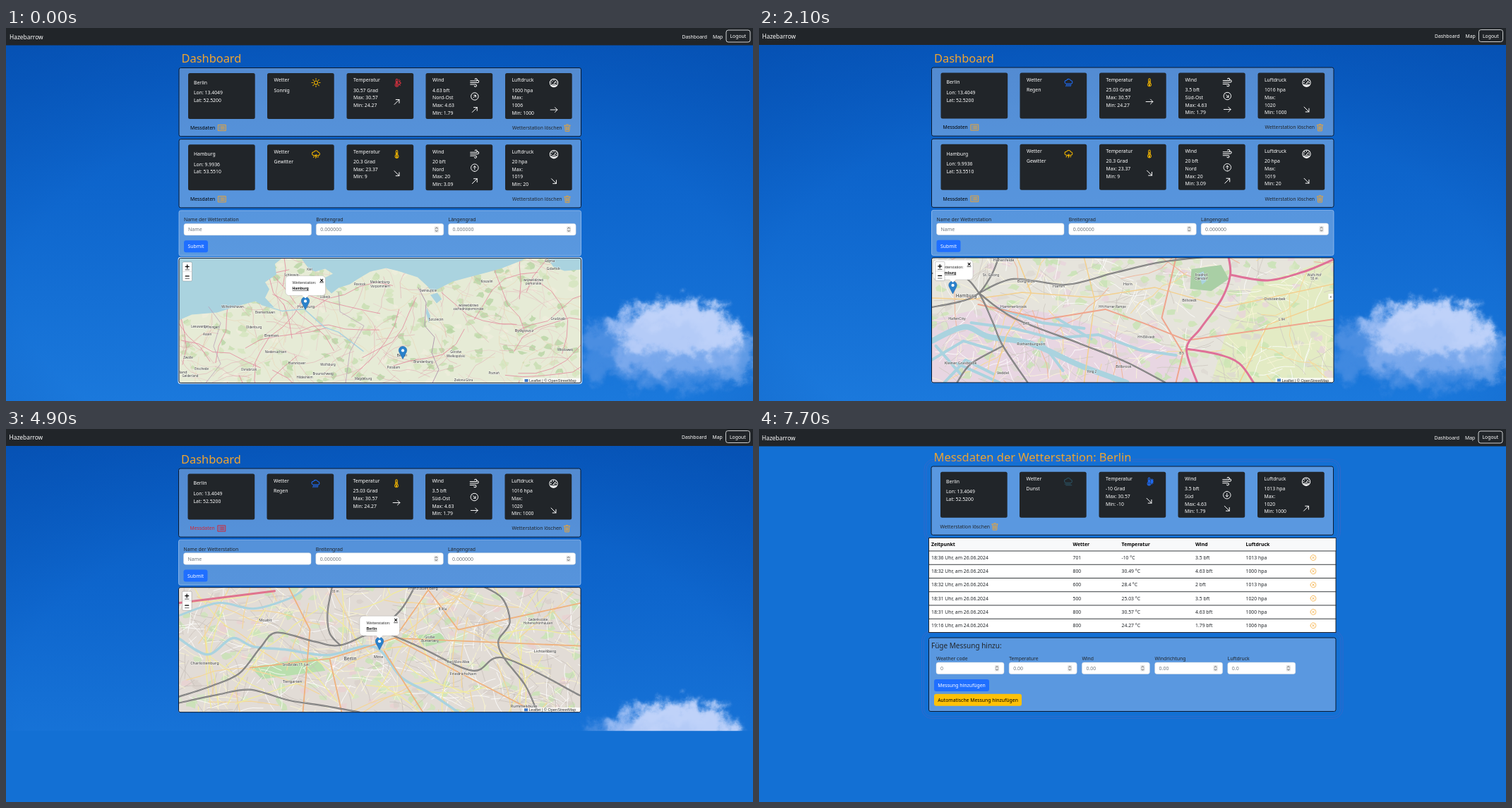
An HTML page that plays this animation: 1058 by 529 pixels, repeating every 8000 ms.

```html
<!DOCTYPE html>
<html lang="de">
<head>
<meta charset="utf-8">
<title>Hazebarrow</title>
<style>
html, body { margin: 0; width: 100%; height: 100%; overflow: hidden; background: #1370d4; }
svg { display: block; width: 1058px; height: 529px; font-family: "Noto Sans", "Open Sans", sans-serif; }
.arial { font-family: "Liberation Sans", Arial, sans-serif; }
.icon { fill: none; stroke-width: 1.25; stroke-linecap: round; stroke-linejoin: round; }
.line { fill: none; stroke-linecap: round; stroke-linejoin: round; }
</style>
</head>
<body>
<svg id="stage" viewBox="0 0 1058 529"></svg>
<script>
const DARK = '#212529', ORANGE = '#f2a52e', AMBER = '#f5b800', BLUE = '#1f6fff', WHITE = '#fff', GLASS = 'rgba(255,255,255,.3)';

// ---- drawing helpers ----
const text = (x, y, s, fill = WHITE, size = 6.85, attrs = '') =>
  `<text x="${x}" y="${y + size * .36}" font-size="${size}" fill="${fill}" ${attrs}>${s}</text>`;
const box = (x, y, w, h, fill, stroke = 'none', r = 2.5, attrs = '') =>
  `<rect x="${x}" y="${y}" width="${w}" height="${h}" rx="${r}" fill="${fill}" stroke="${stroke}" ${attrs}/>`;
const line = (d, color, w, attrs = '') => `<path class="line" d="${d}" stroke="${color}" stroke-width="${w}" ${attrs}/>`;
const group = (x, y, body) => `<g transform="translate(${x} ${y})">${body}</g>`;

// Smooth path through points given as "x,y x,y ...".
function curve(list) {
  const p = list.split(' ').map(s => s.split(',').map(Number));
  return p.slice(1).reduce((d, c, i) => {
    const b = p[i], a = p[i - 1] || b, e = p[i + 2] || c;
    return d + `C${b[0] + (c[0] - a[0]) / 6} ${b[1] + (c[1] - a[1]) / 6} ${c[0] - (e[0] - b[0]) / 6} ${c[1] - (e[1] - b[1]) / 6} ${c}`;
  }, 'M' + p[0]);
}

const CLOUD = 'M4.2 10.5a3 3 0 0 1 .2-6A4.2 4.2 0 0 1 12 5a2.8 2.8 0 0 1 .6 5.5z';
const THERM = 'M6.5 9V2.5a1.5 1.5 0 0 1 3 0V9a3 3 0 1 1-3 0zM8 5v7M7.4 11v2M8.6 11v2';
const ICONS = {
  sun: 'M4.8 8a3.2 3.2 0 1 0 6.4 0a3.2 3.2 0 1 0-6.4 0M8 .6v2M8 13.4v2M.6 8h2M13.4 8h2M2.8 2.8l1.3 1.3M11.9 11.9l1.3 1.3M2.8 13.2l1.3-1.3M11.9 4.1l1.3-1.3',
  clouds: 'M3.4 13a2.6 2.6 0 0 1 .2-5.2A3.7 3.7 0 0 1 10.6 8a2.5 2.5 0 0 1 .4 5zM6 4.8a3.6 3.6 0 0 1 6.6 1.6a2.4 2.4 0 0 1 1 4.2',
  rain: CLOUD + 'M4.5 12l-1 3M7 12l-1 3M9.5 12l-1 3M12 12l-1 3',
  storm: CLOUD + 'M8.4 9l-1.8 3h2.6l-1.8 3M4.5 12l-.7 2M12 12l-.7 2',
  mist: CLOUD + 'M2 12.7h10M4 14.8h10',
  therm: THERM,
  thermSun: THERM + 'M11.5 5.5a2.5 2.5 0 0 1 0 5M12 2v1.3M14 4l-.9 1M15.6 8h-1.4M14 12l-.9-1',
  thermSnow: THERM + 'M13 3v9M11 4.5l4 6M15 4.5l-4 6M10.8 7.5h4.6',
  wind: 'M.5 5h9.8a2 2 0 1 0-1.8-3M.5 8h12.8a2 2 0 1 0-1.8-3M.5 11h8.8a2 2 0 1 1-1.8 3',
  gauge: 'M1 8a7 7 0 1 0 14 0a7 7 0 1 0-14 0M8 9l3.6-4M8 2.5v1.4M3 8h1.2M4.3 4.3l.9.9M11.8 8H13M2.6 12a9 6 0 0 1 10.8 0M3.6 13h8.8M5 14.2h6',
  arrow: 'M1.5 8h13M10 3.5L14.5 8L10 12.5',
  compass: 'M1 8a7 7 0 1 0 14 0a7 7 0 1 0-14 0M4.8 8h6.4M8.6 5.4L11.2 8l-2.6 2.6',
  trash: 'M1.8 3.2h12.4M3 3.2l1 12h8l1-12M6 1.4h4M5.8 6l.3 6.5M8 6v6.5M10.2 6l-.3 6.5',
  list: 'M1 2.5h14v11H1zM3.2 5.5h.2M5.5 5.5h7M3.2 8h.2M5.5 8h7M3.2 10.5h.2M5.5 10.5h7',
  cross: 'M1 8a7 7 0 1 0 14 0a7 7 0 1 0-14 0M5.4 5.4l5.2 5.2M10.6 5.4l-5.2 5.2'
};
const icon = (x, y, name, color, size = 13, turn = 0) =>
  `<path class="icon" d="${ICONS[name]}" stroke="${color}" transform="translate(${x} ${y}) rotate(${turn}) scale(${size / 16}) translate(-8 -8)"/>`;

function random(seed) {
  return () => (seed = seed * 16807 % 2147483647) / 2147483647;
}

// ---- page furniture ----
const defs = `<defs>
  <linearGradient id="sky" x2="0" y2="1"><stop stop-color="#0759bf"/><stop offset=".45" stop-color="#0e66cd"/><stop offset="1" stop-color="#1b79dc"/></linearGradient>
  <radialGradient id="edge" cx=".5" cy=".7" r=".8"><stop offset=".6" stop-color="#0449a8" stop-opacity="0"/><stop offset="1" stop-color="#0449a8" stop-opacity=".5"/></radialGradient>
  <filter id="fluff" x="-20%" y="-30%" width="140%" height="160%" color-interpolation-filters="sRGB"><feGaussianBlur stdDeviation="6" result="soft"/>
    <feTurbulence type="fractalNoise" baseFrequency=".045" numOctaves="5" seed="4" result="noise"/>
    <feDisplacementMap in="soft" in2="noise" scale="42" xChannelSelector="R" yChannelSelector="G"/></filter>
  <clipPath id="frame"><rect x="244" width="569.5" height="177"/></clipPath></defs>`;

function sky(end) {
  const puffs = [
    [848, 440, 42, 22, '#6ea0e8', .6], [862, 478, 58, 20, '#5a96e4', .6], [955, 495, 80, 18, '#5a96e4', .6],
    [1030, 462, 38, 34, '#7eabec', .7], [945, 468, 92, 22, '#86b0ef', .85], [905, 425, 50, 28, '#a2c0f4', .9],
    [955, 415, 68, 27, '#bfd2f9', 1], [990, 437, 54, 25, '#bdd1f9', 1], [930, 440, 62, 20, '#b4cbf7', 1]
  ].map(([x, y, rx, ry, c, o]) => `<ellipse cx="${x}" cy="${y}" rx="${rx}" ry="${ry}" fill="${c}" opacity="${o}"/>`).join('');
  return box(-5, -5, 1068, 540, 'url(#sky)') + box(-5, -5, 1068, 540, 'url(#edge)') +
    `<g filter="url(#fluff)">${puffs}</g>` + (end < 529 ? box(-5, end, 1068, 200, '#1370d4', 'none', 0) : '');
}

const nav = () => box(-5, -5, 1068, 29.5, DARK, 'none', 0) + text(4, 12.5, 'Hazebarrow', WHITE, 8.4) +
  text(956.5, 12.5, 'Dashboard') + text(1000, 12.5, 'Map') +
  box(1019, 3, 34, 17, 'none', '#f8f9fa', 3, 'stroke-width=".8"') + text(1024.5, 12, 'Logout');

const halo = (x, y, w, h) => [7, 10].map(p =>
  box(x - p, y - p, w + 2 * p, h + 2 * p, 'none', '#4c63c4', p + 4, 'stroke-width=".8" opacity=".6"')).join('');

function field(x, y, w, hint, spin = true) {
  return box(x, y, w, 16.5, WHITE, '#ced4da', 3, 'stroke-width=".5"') + text(x + 6, y + 8.5, hint, '#6c757d', 7) +
    (spin ? box(x + w - 13, y + 4, 6, 8.5, '#e3e3e3', 'none', 1) +
      line(`M${x + w - 11.5} ${y + 7}l1.5-1.6l1.5 1.6m0 2.6l-1.5 1.6l-1.5-1.6`, '#555', .8) : '');
}
const button = (x, y, w, label, fill, ink) => box(x, y, w, 17, fill, 'none', 3) +
  text(x + w / 2, y + 8.8, label, ink, 6.85, 'text-anchor="middle"');

// ---- stations ----
const station = (name, lon, lat, weather, sky, temp, wind, air) => ({ name, lon, lat, weather, sky, temp, wind, air });
const berlin = (...now) => station('Berlin', '13.4049', '52.5200', ...now);
const berlinSun = berlin('Sonnig', ['sun', AMBER], [30.57, 30.57, 24.27, -45, 'thermSun', '#d9303e'],
  [4.63, 4.63, 1.79, -45, 'Nord-Ost', -45], [1000, 1006, 1000, 0]);
const berlinRain = berlin('Regen', ['rain', BLUE], [25.03, 30.57, 24.27, 0, 'therm', AMBER],
  [3.5, 4.63, 1.79, 0, 'Süd-Ost', 45], [1016, 1020, 1000, 45]);
const berlinCloud = berlin('Bewölkt', ['clouds', WHITE], [5, 30.57, 5, 45, 'therm', '#22b5e8'],
  [3.7, 4.63, 1.79, -45, 'Süd-West', 135], [1012, 1020, 1000, 45]);
const berlinMist = berlin('Dunst', ['mist', '#2b5263'], [-10, 30.57, -10, 45, 'thermSnow', BLUE],
  [3.5, 4.63, 1.79, 45, 'Süd', 90], [1013, 1020, 1000, -45]);
const hamburg = station('Hamburg', '9.9936', '53.5510', 'Gewitter', ['storm', AMBER], [20.3, 23.37, 9, 45, 'therm', AMBER],
  [20, 20, 3.09, -45, 'Nord', -90], [20, 1019, 20, 45]);
const newYork = station('New York', '-73.9352', '40.73061', 'Bewölkt', ['clouds', WHITE], [15, 31.2, 15, 0, 'therm', AMBER],
  [9.6, 9.77, 9.5, -45, 'Süd-Ost', 45], [1012, 1012, 1007, -45]);
const seoul = station('Seoul', '127.0246', '37.5326');

const pitch = s => s.weather ? 101.2 : 91;

function cards(s, top) {
  const full = s.weather, h = full ? 65 : 54.5;
  const column = (x, head, rows, extra = '') => group(x, top, box(0, 0, 94.7, h, DARK) + text(9.5, 10, head) +
    rows.map((r, i) => text(9.5, 24.2 + i * 10.7, r)).join('') + extra);
  const range = ([, max, min]) => ['Max: ' + max, 'Min: ' + min];
  const { temp = ['-', '-', '-'], wind = ['-', '-', '-'], air = ['-', '-', '-'] } = s;
  return group(257, top, box(0, 0, 94.7, h, DARK) + text(8, 13.5, s.name) +
      text(8, 28, 'Lon: ' + s.lon) + text(8, 38.6, 'Lat: ' + s.lat)) +
    column(369, 'Wetter', full ? [full] : ['no', 'measurement'], full ? icon(69, 13.5, ...s.sky) : '') +
    column(481.5, 'Temperatur', [temp[0] + ' Grad', ...range(temp)],
      full ? icon(71, 14, temp[4], temp[5]) + icon(71, 41, 'arrow', WHITE, 12, temp[3]) : '') +
    column(593.5, 'Wind', [wind[0] + ' bft', ...(full ? [wind[4]] : []), ...range(wind)], icon(69.3, 13.5, 'wind', WHITE) +
      (full ? icon(69.3, 33, 'compass', WHITE, 12, wind[5]) + icon(69.3, 52, 'arrow', WHITE, 12, wind[3]) : '')) +
    column(706, 'Luftdruck', [air[0] + ' hpa', ...(full ? ['Max:', air[1], 'Min: ' + air[2]] : range(air))],
      icon(69, 14, 'gauge', WHITE) + (full ? icon(69, 52, 'arrow', WHITE, 12, air[3]) : ''));
}

function panel(s, top, hover) {
  const foot = top + pitch(s) - 16.2, ink = hover ? '#d8232f' : '#000';
  return box(244, top, 569.5, pitch(s) - 4, GLASS, '#0b1a30') + cards(s, top + 7.5) +
    text(260, foot, 'Messdaten', ink) + icon(305, foot, 'list', hover ? ink : ORANGE, 12) +
    text(716, foot, 'Wetterstation löschen', DARK) + icon(794, foot, 'trash', ORANGE, 11);
}

// ---- maps ----
const SEA = '#aad3df', PARK = '#c5e3b0', WOOD = '#b4d3a0', PINK = '#e2889c', RAIL = '#707070';

// Seeded patches and wandering roads: n items, each of the given reach.
function patches(rnd, n, colors, reach) {
  let out = '';
  for (let i = 0; i < n; i++) {
    const x = 244 + rnd() * 570, y = rnd() * 177;
    const pts = Array.from({ length: 7 }, (_, k) => {
      const r = reach * (.3 + rnd()), a = k * .9;
      return `${(x + r * 1.3 * Math.cos(a)).toFixed(1)},${(y + r * Math.sin(a)).toFixed(1)}`;
    });
    out += `<polygon points="${pts.join(' ')}" fill="${colors[i % colors.length]}" opacity=".75"/>`;
  }
  return out;
}
function roads(rnd, n, colors, reach, width, bend = 1) {
  let out = '';
  for (let i = 0; i < n; i++) {
    let a = rnd() * 7, d = `M${(244 + rnd() * 570).toFixed(1)} ${(rnd() * 177).toFixed(1)}`;
    for (let k = 0; k < 5; k++, a += (rnd() - .5) * bend)
      d += `l${(reach * Math.cos(a)).toFixed(1)} ${(reach * Math.sin(a)).toFixed(1)}`;
    out += line(d, colors[i % colors.length], width);
  }
  return out;
}
const water = d => `<path d="${d}" fill="${SEA}"/>`;
const tracks = (...lists) => lists.map(s => line(curve(s), RAIL, 2.2) + line(curve(s), '#c4c4c4', .5)).join('');
const labels = (list, size) => list.split(';').map(s => {
  const [x, y, name] = s.split(',');
  return text(+x, +y, name, '#333', size, 'text-anchor="middle" paint-order="stroke" stroke="#ffffffb0" stroke-width="1"');
}).join('');

const MAPS = {
  north() {
    const r = random(71);
    return box(244, 0, 570, 177, '#e6ebd6', 'none', 0) + patches(r, 320, [WOOD, '#d3e4bd', '#efeedd', '#c4dcae'], 5) +
      roads(r, 220, ['#e6c3c3', '#dfa3ad', '#e9cfae'], 11, .5) + roads(r, 34, [PINK], 24, .8) +
      water('M244 88L262 80L298 77L330 67L352 61L361 66L379 70L366 56L372 44L366 34L382 23L380 8L390 0H244z') +
      water('M417 0L428 15L437 19L451 15L462 22L448 29L453 43L460 50L470 42L486 37L495 31L515 19L537 14L554 18L582 27L594 38L603 47L612 43L632 33L658 26L681 20L702 14L730 3L735 0z') +
      water('M766 0L774 12L790 18L814 16V0z') + water('M600 52l10-3l6 9l-7 6zM595 70l5 12l-2 10l-4-14z') +
      line('M361 66L390 75L421 72L450 98L470 105L505 132', SEA, 1.5) +
      line('M583 42L594 63L592 96L606 112L602 134L612 158L603 177', '#a887a8', .8) +
      line('M286 69L303 92L293 125L303 150L282 177M470 48L472 76L506 96L486 133L480 177', '#b798b5', .7) +
      labels('429,16,Kiel;404,24,Schleswig-;404,29,Holstein;500,37,Rostock;529,34,Mecklenburg-;529,40,Vorpommern;451,55,Lübeck;366,77,Bremerhaven;350,98,Oldenburg;290,98,Groningen;284,108,Assen;274,97,Leeuwarden;320,69,Wilhelmshaven;257,141,Zwolle;276,157,Enschede;343,158,Osnabrück;455,151,Wolfsburg;422,169,Hildesheim;448,164,Braunschweig;548,155,Potsdam;590,147,Brandenburg;597,46,Świnoujście;680,33,Koszalin;636,133,Gorzów;636,139,Wielkopolski;769,4,Gdynia;746,31,województwo;746,36,pomorskie;654,67,województwo;654,72,zachodniopomorskie;690,163,Poznań;791,130,Włocławek;781,86,Grudziądz;260,167,Gelderland;381,133,Niedersachsen;505,171,Magdeburg;647,173,Zielona Góra', 4.4) +
      labels('424,69,Hamburg;375,110,Bremen;411,149,Hannover;608,87,Szczecin;774,15,Gdańsk;733,103,Bydgoszcz;560,138,Berlin;250,162,land', 5.4);
  },
  coast() {
    const r = random(29);
    return box(244, 0, 570, 177, '#efeee2', 'none', 0) + patches(r, 150, [PARK, '#dbe8c9', '#e8e4dc'], 7) +
      roads(r, 170, ['#e9b1a2', '#e6a2ad', '#f0cfa0'], 12, .6) + roads(r, 40, ['#e06f84'], 22, .8) +
      water('M512 177L508 120L518 92L514 62L503 47L517 45L533 40L560 36L598 30L631 23L668 9L692 0H814V177z') +
      water('M523 20L540 10L560 5L592 0H650L620 8L589 13L552 17L532 23z') +
      line('M511 2L514 20L508 42', SEA, 2) + line('M440 110L431 92L417 76L423 55L405 34L412 0', SEA, 1.5) +
      line('M531 105L532 74L549 69L571 60L609 50L641 37L653 20L678 13L724 0', '#a98bb0', 1) +
      line('M500 36l50 -7l70-12M480 60l25-22l8-34M470 48l36-6M455 22l51 18M430 98l38-40l38-20', '#df5f78', 1.1) +
      labels('386,49,Allentown;408,40,Easton;311,77,Lebanon;274,85,Harrisburg;345,13,Hazleton;477,62,New Brunswick;455,91,Levittown;492,15,Paterson;569,30,Brentwood;540,36,Hempstead;430,82,Trenton;360,82,Reading;318,12,Bloomsburg;556,2,Norwalk;520,86,Toms River', 4.6) +
      labels('507,37,NEW YORK', 5.6) + text(581, 22, 'Long Island', '#333', 5.4, 'text-anchor="middle" font-style="italic" font-weight="bold"');
  },
  harbour() {
    const r = random(513);
    return box(244, 0, 570, 177, '#e6e4dc', 'none', 0) +
      `<path d="M244 88L340 66L420 80L590 130L620 177H244z" fill="#e8d6e2"/><path d="M700 40L814 0V177H640L660 110z" fill="#e3ebc4"/>` +
      patches(r, 230, [PARK, '#d9e9c4', '#dcd8d2', '#cae4b2', '#e9d3dc'], 6) +
      roads(r, 330, [WHITE, '#faf6d8', '#cfc8c1'], 7, .8, .5) + roads(r, 26, ['#f4da9c', '#efb9a0'], 20, 1.1) +
      `<path d="M612 16L654 10L665 30L640 47L610 44z" fill="#a9cfa5"/>` + water('M622 22l7-3l4 14l-6 5z') +
      line(curve('244,118 290,98 325,112 385,122 455,153 520,177'), SEA, 8) +
      line('M244 145l45-27l40 12M262 177l30-32l40 20M300 92l60 8l55 14l65-5l60 22l50 7M340 72l60 20l60 8M250 125l35 40M400 120l30 40M280 150l60 27M420 85l50 30', SEA, 4) +
      line('M244 57L300 59L372 49L470 56L560 42L660 70L814 37M365 0L385 50L350 110L330 177M460 0L475 60L460 177M680 177L720 95L814 60', '#f3d08f', 1.5) +
      line('M310 66L405 87L490 73L545 93L605 117L690 105L814 87M590 177L600 135L570 85L590 0', '#efa58d', 2) +
      tracks('244,22 285,24 311,50 330,90 345,125 380,177', '311,50 360,30 435,38 500,22 570,6 660,-4',
        '311,50 360,85 455,122 520,148 575,177', '244,70 285,62 311,50 330,22 340,-4', '345,125 300,150 280,177') +
      line(curve('664,-4 667,24 655,58 625,100 605,129 620,177') + curve('667,24 720,32 770,20 814,2') + curve('605,129 650,137 680,150 700,177'), '#df7198', 3) +
      labels('346,3,Hohenfelde;328,24,St. Georg;378,33,Borgfelde;424,40,Hamm;522,37,Horn;360,69,Hammerbrook;280,86,HafenCity;385,122,Rothenburgsort;285,149,Kleiner Grasbrook;345,163,Veddel;516,154,Billbrook;609,60,Billstedt;730,58,Oststeinbek', 5.4) +
      labels('626,25,Friedhof;626,30,Öjendorf;378,94,B 75;598,136,B 5;471,162,Ring 2;740,88,L 94;500,70,HH-Horner Rampe;548,113,HH-Billstedt;786,25,Wulfs Hof;786,30,55 m', 4.4) +
      labels('293,54,Hamburg', 6.6) + box(806, 51, 7.5, 8, WHITE, 'none', 0) + text(808, 55, 'x', '#333', 5);
  },
  city() {
    const r = random(907);
    return box(244, 0, 570, 177, '#e2dcd6', 'none', 0) + patches(r, 240, [PARK, '#d8d1ca', '#cce6b8', '#ead0d0', '#d5e8c4'], 6) +
      `<path d="M345 112L440 99L452 118L362 130z" fill="#b9dfae"/><path d="M580 68l35-4l8 13l-30 7z" fill="#b9dfae"/>` +
      roads(r, 480, [WHITE, '#fbf6cf', '#cac2bb'], 7, .8, .4) + roads(r, 70, ['#f1eb9c', '#f3d69c'], 20, 1.3, .4) +
      line(curve('244,72 285,95 320,72 350,84 395,88 455,96 520,84 560,128 600,150 640,177'), SEA, 3.5) +
      line(curve('244,40 300,22 350,30 400,16 425,0'), SEA, 3) + line('M244 22L380 5', '#e0748e', 3) +
      line('M345 114L458 101L550 72L814 83M458 101L475 177M550 72L600 0M550 72L640 120L750 177M535 90L590 177M595 0L640 60L814 22M400 0L430 60L420 177', '#efb27e', 1.8) +
      tracks('244,155 290,140 330,122 360,85 383,64 437,77 473,82 526,64 580,82 660,118 705,100 812,153',
        '244,164 300,152 345,145 400,160 450,168 500,177', '670,-4 702,15 713,50 697,75 705,100 735,139 752,177',
        '462,-4 455,35 458,65 473,82', '526,64 560,30 580,-4') +
      labels('367,46,Moabit;281,107,Charlottenburg;405,133,Tiergarten;527,98,Mitte;763,90,Lichtenberg;647,122,Friedrichshain;590,1,Prenzlauer Berg;733,168,Rummelsburg', 5.6) +
      labels('753,46,Gedenkstätte;753,51,Hohenschönhausen;618,31,B 96a;600,71,Großer;600,76,Bunkerberg;410,110,Straße des 17. Juni;466,6,65 m;640,106,Karl-Marx-Allee', 4.4) + labels('487,101,Berlin', 6.6);
  }
};

const pin = (x, y) => `<path d="M${x} ${y}l-5-9.5a5.7 5.7 0 1 1 10 0z" fill="#2a81cb" stroke="#2469a6" stroke-width=".6"/><circle cx="${x}" cy="${y - 12}" r="2.1" fill="#fff"/>`;
const popup = (x, y, name) => box(x - 28, y - 48, 56.5, 28, WHITE, '#0002', 5) + `<path d="M${x - 5} ${y - 21}h10l-5 5z" fill="#fff"/>` +
  text(x - 18.5, y - 38, 'Wetterstation:', '#333', 5.5) + text(x - 18.5, y - 30, name, '#111', 5.3, 'font-weight="bold" text-decoration="underline"') +
  text(x + 20.5, y - 42, '×', '#000', 9, 'font-weight="bold"') + line(`M${x + 20.5} ${y - 38.5}h5`, '#000', .7);

const PINS = {
  north: pin(561, 143) + pin(423, 73) + popup(423, 73, 'Hamburg'),
  coast: pin(513, 35),
  harbour: pin(274, 51) + popup(274, 51, 'Hamburg'),
  city: pin(528.5, 88.5) + popup(528.5, 88.5, 'Berlin')
};

function mapBox(kind, top) {
  const lit = kind == 'north' || kind == 'coast';
  return group(0, top, `<g clip-path="url(#frame)">${MAPS[kind]()}<g class="arial">${PINS[kind]}` +
    box(249, 5.5, 13.5, 27, WHITE, '#0003', 1.5) + line('M249 19h13.5', '#ccc', .6) +
    line('M253.2 12h5M255.7 9.5v5M253.2 25.5h5', '#000', 1.2) + line('M253 16.5h5.5M253 29h5.5', '#000', .6) +
    box(731, 170.3, 83, 7, '#ffffffc8', 'none', 0) + box(733.5, 171.6, 5, 4, '#3d78c8', 'none', 0) +
    text(740, 173.7, 'Leaflet | © OpenStreetMap', '#333', 5.6) + '</g></g>' +
    (lit ? box(243.3, -.8, 571, 178.6, 'none', '#cfe2f7', 3, 'stroke-width="1.6"') : '') +
    box(244, 0, 569.5, 177, 'none', '#0b1a30'));
}

// ---- pages ----
function dashboard(stations, map, hover) {
  let y = 56.5, out = '';
  for (const s of stations) {
    out += panel(s, y, hover);
    y += pitch(s);
  }
  out += box(244, y, 569.5, 64, GLASS, '#9cc0ee', 2.5, 'stroke-width=".8"');
  ['Name der Wetterstation', 'Breitengrad', 'Längengrad'].forEach((label, i) => {
    const x = 251 + i * 187.3;
    out += text(x, y + 13, label, DARK) + field(x, y + 18.5, 180.5, i ? '0.000000' : 'Name', i > 0);
  });
  out += button(251, y + 42.3, 34, 'Submit', BLUE, WHITE) + mapBox(map, y + 67.5);
  return sky(y + 271) + nav() + text(247.5, 43.5, 'Dashboard', ORANGE, 16.4) + out;
}

function readings(s, rows) {
  const cols = [244, 444.5, 513.5, 618, 689.5], end = 173 + rows.length * 19.25, top = end + 7.5;
  let out = box(-5, -5, 1068, 540, '#1370d4', 'none', 0) + nav() +
    text(247.5, 40, 'Messdaten der Wetterstation: ' + s.name, ORANGE, 16.5) +
    halo(244, 53, 569.5, 97.3) + box(244, 53, 569.5, 97.3, '#5a98e0', '#0b1a30') + cards(s, 60.7) +
    text(256.5, 138.5, 'Wetterstation löschen', DARK) + icon(334, 138.3, 'trash', ORANGE, 11) +
    halo(240.5, top, 576.5, 104.5) + box(240.5, 154.5, 576.5, end - 154.5, WHITE, DARK, 0) + box(241, 155, 575.5, 18, '#f8f9fa', 'none', 0);
  ['Zeitpunkt', 'Wetter', 'Temperatur', 'Wind', 'Luftdruck'].forEach((h, i) => out += text(cols[i], 163.7, h, '#000', 6.85, 'font-weight="bold"'));
  rows.forEach(([time, day, code, temp, wind, air], n) => {
    const y = 173 + n * 19.25;
    out += line(`M240.5 ${y}H817`, DARK, .9) + icon(785, y + 9.5, 'cross', ORANGE, 9);
    [`${time} Uhr, am ${day}.06.2024`, code, temp + ' °C', wind + ' bft', air + ' hpa']
      .forEach((v, i) => out += text(cols[i], y + 9.5, v, DARK));
  });
  out += box(240.5, top, 576.5, 104.5, '#5a98e0', '#0b1a30') + text(244, top + 11, 'Füge Messung hinzu:', DARK, 10);
  ['Weather code', 'Temperature', 'Wind', 'Windrichtung', 'Luftdruck'].forEach((label, i) => {
    const x = 251 + i * 103.2;
    out += text(x, top + 29.8, label, DARK) + field(x, top + 35, 96, ['0', '0.00', '0.00', '0.00', '0.0'][i]);
  });
  return out + button(248, top + 59, 78, 'Messung hinzufügen', BLUE, WHITE) +
    button(248, top + 79.8, 124, 'Automatische Messung hinzufügen', '#ffc107', '#000');
}

const past = [['18:31', 26, 500, 25.03, 3.5, 1020], ['18:31', 26, 800, 30.57, 4.63, 1000], ['19:16', 24, 800, 24.27, 1.79, 1006]];
const snow = ['18:32', 26, 600, 28.4, 2, 1013];
const cloudy = [['18:38', 26, 801, 5, 3.7, 1012], snow, ...past];
const misty = [['18:36', 26, 701, -10, 3.5, 1013], ['18:32', 26, 800, 30.49, 4.63, 1000], snow, ...past];

// Each scene holds for 700 ms: x shift, y shift, content.
const scenes = [
  [1, 0, dashboard([berlinSun, hamburg], 'north')],
  [.5, -1, dashboard([berlinRain, hamburg], 'north')],
  [0, -3, dashboard([newYork, berlinRain, hamburg], 'coast')],
  [.5, -.5, dashboard([berlinRain, hamburg], 'harbour')],
  [0, 0, dashboard([seoul, berlinRain, hamburg], 'harbour')],
  [.5, -.5, dashboard([berlinRain, hamburg], 'harbour')],
  [0, 0, dashboard([berlinRain], 'city')],
  [.5, -.5, dashboard([berlinRain], 'city', true)],
  [0, 0, readings(berlinRain, past)],
  [0, -1, readings(berlinCloud, cloudy)],
  [1, 0, readings(berlinMist, misty)],
  [0, 0, readings(berlinMist, misty)]
];

const stage = document.getElementById('stage');
let shown = -1;
function tick() {
  const n = Math.floor(performance.now() % 8000 / 700);
  if (n != shown) {
    const [x, y, body] = scenes[shown = n];
    stage.innerHTML = defs + group(x, y, body);
  }
  requestAnimationFrame(tick);
}
tick();
</script>
</body>
</html>
```
